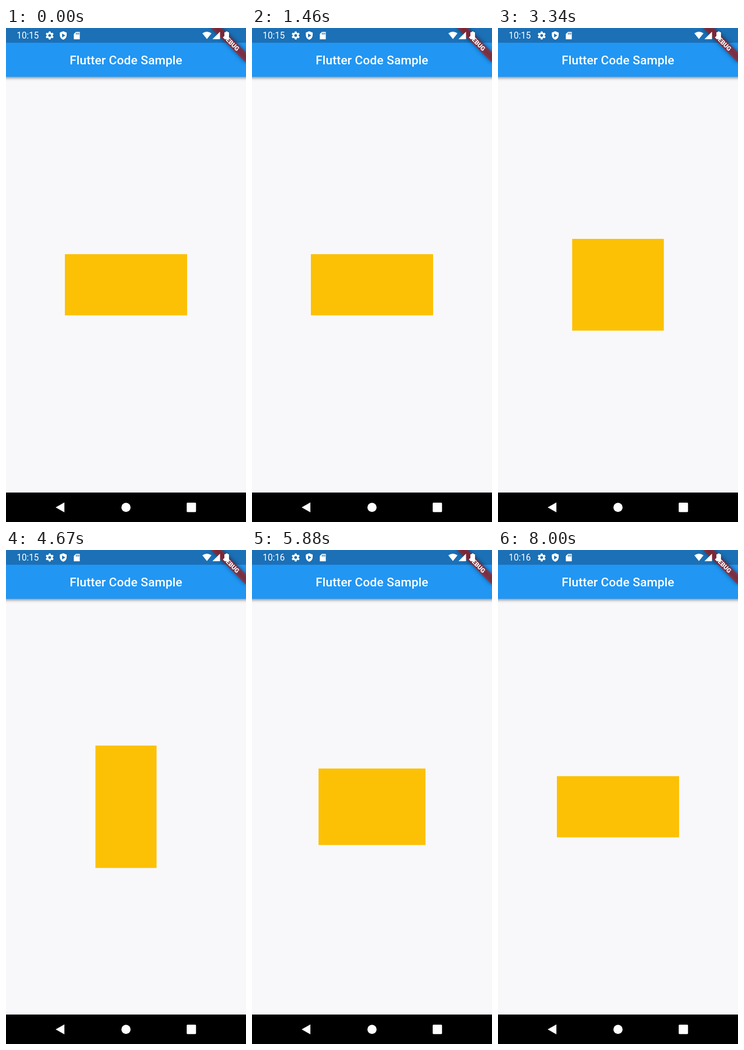
These frames come from a looping animation (522 px wide and 1073 px high, 8.13 s). An HTML page with a canvas:

```html
<!DOCTYPE html>
<html lang="en">
<head>
<meta charset="utf-8">
<title>Flutter Code Sample</title>
<style>
  html, body { margin: 0; width: 100%; height: 100%; overflow: hidden; background: #000; }
  canvas { display: block; width: 522px; height: 1073px; }
</style>
</head>
<body>
<canvas id="stage" width="522" height="1073"></canvas>
<script>
const W = 522, H = 1073, LOOP = 8130;
const BAR_TOP = 32, BAR_BOTTOM = 106, BODY_BOTTOM = 1009;
const DP = 1.3292;
const CLOCK_TICK = 5090;
const GROW = [2960, 3250, 3710, 4210];
const SHRINK = [4830, 5330, 5830, 6330];
const ctx = document.getElementById('stage').getContext('2d');

function rect(color, x, y, w, h) {
  ctx.fillStyle = color;
  ctx.fillRect(x, y, w, h);
}

function poly(color, ...points) {
  ctx.fillStyle = color;
  ctx.beginPath();
  points.forEach(([x, y]) => ctx.lineTo(x, y));
  ctx.closePath();
  ctx.fill();
}

function disc(color, x, y, r) {
  ctx.fillStyle = color;
  ctx.beginPath();
  ctx.arc(x, y, r, 0, Math.PI * 2);
  ctx.fill();
}

function text(str, x, y, font, align = 'left', spacing = 0) {
  ctx.font = font;
  ctx.textAlign = align;
  ctx.letterSpacing = spacing + 'px';
  ctx.fillStyle = '#fff';
  ctx.fillText(str, x, y);
}

function appBar() {
  ctx.save();
  ctx.shadowColor = 'rgba(0,0,0,0.42)';
  ctx.shadowBlur = 6;
  ctx.shadowOffsetY = 2.5;
  rect('#2196f3', -10, 0, W + 20, BAR_BOTTOM);
  ctx.restore();
  rect('#1b70b6', 0, 0, W, BAR_TOP);
  text('Flutter Code Sample', 261, 79, '500 26.58px Roboto, sans-serif', 'center', 0.15);
}

function debugBanner() {
  ctx.save();
  ctx.translate(W, 0);
  ctx.rotate(Math.PI / 4);
  const band = [-40 * DP, 28 * DP, 80 * DP, 12 * DP];
  ctx.filter = 'blur(5px)';
  rect('rgba(0,0,0,0.5)', ...band);
  ctx.filter = 'none';
  rect('rgba(183,28,28,0.627)', ...band);
  text('DEBUG', 0, 34 * DP + 4.9, '900 13.56px Roboto, sans-serif', 'center');
  ctx.restore();
}

function gear(x, y) {
  ctx.save();
  ctx.translate(x, y);
  for (let i = 0; i < 6; i++) {
    poly('#fff', [-2.6, -5], [-1.9, -8.8], [1.9, -8.8], [2.6, -5]);
    ctx.rotate(Math.PI / 3);
  }
  disc('#fff', 0, 0, 6.6);
  disc('#1b70b6', 0, 0, 3);
  ctx.restore();
}

function shield() {
  ctx.fillStyle = '#fff';
  ctx.beginPath();
  ctx.moveTo(124.5, 7);
  ctx.lineTo(132, 10);
  ctx.lineTo(132, 15.5);
  ctx.quadraticCurveTo(131.5, 23, 124.5, 25.5);
  ctx.quadraticCurveTo(117.5, 23, 117, 15.5);
  ctx.lineTo(117, 10);
  ctx.fill();
  poly('#1b70b6', [122, 12], [129, 16.2], [122, 20.4]);
}

function memoryCard() {
  poly('#fff', [152, 8.5], [160.5, 8.5], [160.5, 24.5], [147.5, 24.5], [147.5, 13]);
  [152, 154.8, 157.6].forEach(x => rect('#1b70b6', x, 10.5, 1.5, 3.7));
}

function statusIcons() {
  gear(95, 16.2);
  shield();
  memoryCard();
  ctx.fillStyle = '#fff';
  ctx.beginPath();
  ctx.moveTo(437, 24);
  ctx.lineTo(427, 11.5);
  ctx.quadraticCurveTo(437, 4.5, 447, 11.5);
  ctx.fill();
  poly('#fff', [465.5, 8], [465.5, 24.3], [449, 24.3]);
  rect('#fff', 478, 7.5, 4, 2.5);
  ctx.beginPath();
  ctx.roundRect(475, 9, 10, 15.5, 1.2);
  ctx.fill();
}

function navBar() {
  rect('#000', 0, BODY_BOTTOM, W, H - BODY_BOTTOM);
  poly('#fff', [108, 1041.2], [127, 1030.5], [127, 1052]);
  disc('#fff', 261, 1041.2, 10);
  ctx.beginPath();
  ctx.roundRect(393, 1031, 20.3, 20.5, 2);
  ctx.fill();
}

// The box trades width for height in steps of 25 logical pixels.
function box(t) {
  const passed = times => times.filter(at => t >= at).length;
  const step = passed(GROW) - passed(SHRINK);
  const w = (200 - 25 * step) * DP, h = (100 + 25 * step) * DP;
  rect('#fcc105', 261 - w / 2, 557.7 - h / 2, w, h);
}

function draw(now) {
  const t = now % LOOP;
  rect('#f8f8fb', 0, 0, W, H);
  box(t);
  appBar();
  debugBanner();
  text(t < CLOCK_TICK ? '10:15' : '10:16', 23.3, 23.4, '19.3px Roboto, sans-serif');
  statusIcons();
  navBar();
  requestAnimationFrame(() => draw(performance.now() - start));
}

const start = performance.now();
draw(0);
</script>
</body>
</html>
```
